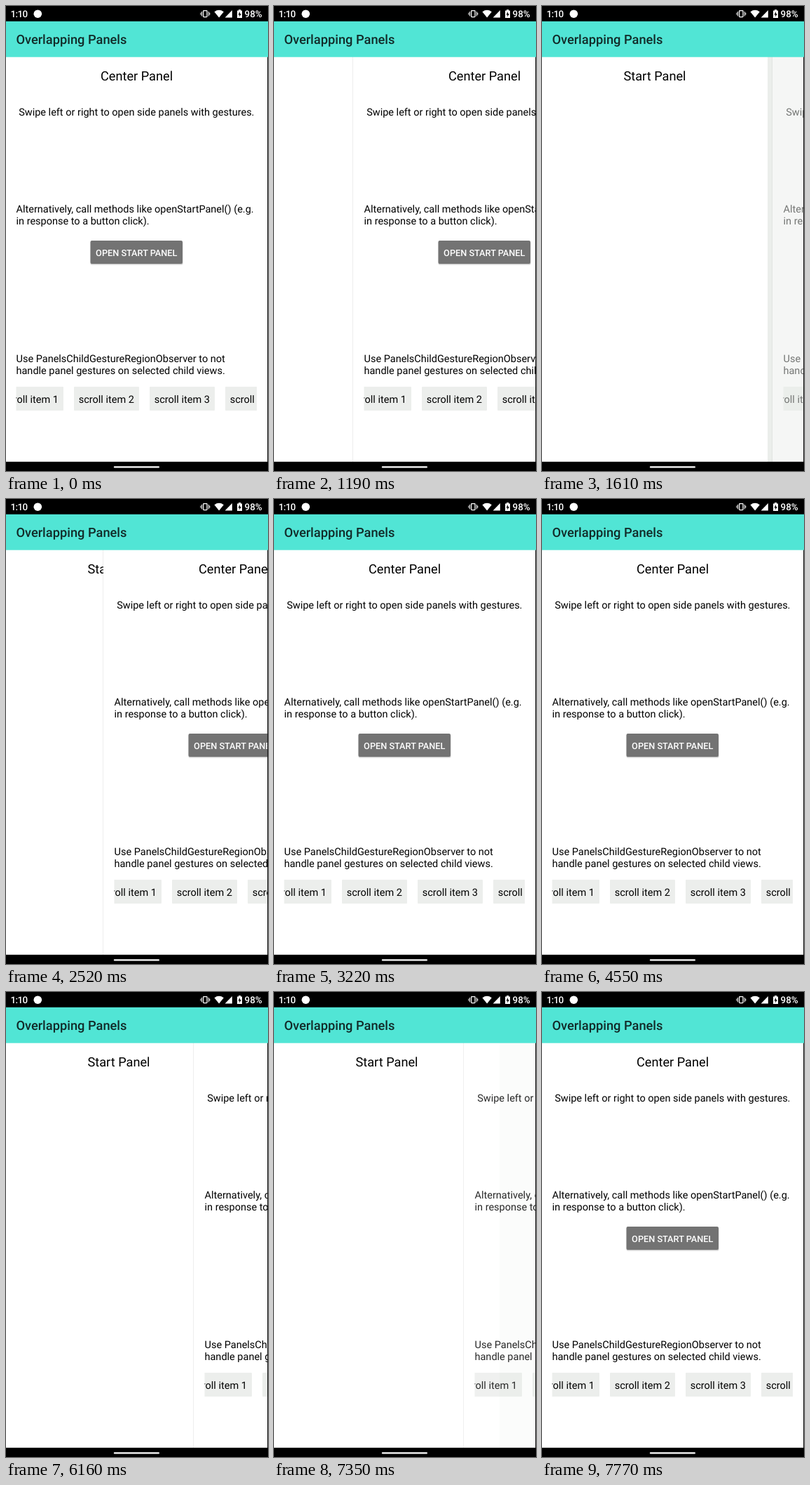
Write an HTML page that moves like this. It is 374 px wide and 662 px high and loops after 8 s.

```html
<!DOCTYPE html>
<html lang="en">
<head>
<meta charset="utf-8">
<title>Overlapping Panels</title>
<style>
  html, body { margin: 0; width: 100%; height: 100%; overflow: hidden; background: #000; }
  svg { display: block; width: 374px; height: 662px; font: 14.5px Roboto, sans-serif; text-rendering: geometricPrecision; }
  .head { font-size: 18.2px; }
  .mid { text-anchor: middle; }
  .title { font-size: 18.25px; font-weight: 500; fill: #122b29; }
  .button { font-size: 12.73px; font-weight: 500; fill: #fff; }
  .status { font-size: 13.4px; font-weight: 500; fill: #fff; }
  .clock { letter-spacing: -.6px; }
  .chip { fill: #eceeec; }
</style>
</head>
<body>
<svg viewBox="0 0 374 662">
  <defs>
    <clipPath id="strip"><rect x="14.5" y="540" width="343.5" height="40"/></clipPath>
  </defs>

  <rect y="72" width="374" height="577" fill="#ebeeeb"/>
  <g id="start">
    <rect y="72" width="322" height="577" fill="#fff"/>
    <text class="head mid" x="161" y="106">Start Panel</text>
  </g>
  <g id="end">
    <rect x="51" y="72" width="323" height="577" fill="#fff"/>
    <text class="head mid" x="211.7" y="106">End Panel</text>
  </g>

  <g id="center">
    <path d="M-1.5 72V649M374.5 72V649" stroke="#000" stroke-opacity=".07"/>
    <rect x="-1" y="72" width="375" height="577" fill="#fff"/>
    <text class="head mid" x="186.5" y="106">Center Panel</text>
    <text class="mid" x="186.3" y="156">Swipe left or right to open side panels with gestures.</text>
    <text x="14.5" y="293.5">Alternatively, call methods like openStartPanel() (e.g.</text>
    <text x="14.5" y="310.5">in response to a button click).</text>
    <rect x="120.5" y="335" width="132" height="33.5" rx="2" opacity=".18"/>
    <rect x="120.5" y="334" width="131.5" height="33" rx="2" fill="#737373"/>
    <text class="button mid" x="186.2" y="356">OPEN START PANEL</text>
    <text x="14.5" y="506.5">Use PanelsChildGestureRegionObserver to not</text>
    <text x="14.5" y="523.5">handle panel gestures on selected child views.</text>
    <g id="chips" clip-path="url(#strip)"></g>
  </g>

  <rect x="373" y="72" width="1" height="577" fill="#1c1c1c"/>
  <rect width="374" height="22"/>
  <rect y="21.8" width="374" height="50.9" fill="#51e5d5"/>
  <text class="title" x="14.4" y="54">Overlapping Panels</text>

  <text class="status clock" x="6.5" y="16">1:10</text>
  <g fill="#fff">
    <circle cx="45.3" cy="11.2" r="5.8"/>
    <rect x="281.6" y="6.6" width="5.4" height="9" rx=".8" fill="none" stroke="#fff" stroke-width="1.3"/>
    <path d="M279.4 8v6.4M289.3 8v6.4M277.9 9.6v3M290.8 9.6v3" stroke="#fff"/>
    <path d="M297.4 8.2Q304 3.4 310.8 8.2L304.1 16.4Z"/>
    <path d="M312.6 16.4L322.8 6V16.4Z"/>
    <path d="M330 6.4H332V5H335V6.4H337V17H330Z"/>
    <path d="M334 8L331.4 12.4H333.2V15.4L335.7 11H334Z" fill="#000"/>
  </g>
  <text class="status" x="340.6" y="16">98%</text>

  <rect y="648.8" width="374" height="13.2"/>
  <rect x="153.8" y="655.3" width="65.2" height="2.2" rx="1.1" fill="#fff"/>
</svg>

<script>
  const LOOP = 8000, TICK = 70, OPEN_X = 330, DIM = 0.5, FADE = 210;

  // Each visit to a side panel: side, open from/to, close from/to (ms).
  const visits = [
    [1, 1050, 1400, 2240, 2750],
    [-1, 3220, 3570, 3990, 4500],
    [1, 5810, 6298, 7210, 7720]
  ];

  const $ = id => document.getElementById(id);
  const [start, end, center] = ['start', 'end', 'center'].map($);
  const ramp = (t, a, b) => Math.min(1, Math.max(0, (t - a) / (b - a)));
  const ease = p => (1 - Math.cos(Math.PI * p)) / 2;

  $('chips').innerHTML = [1, 2, 3, 4].map(n => {
    const x = 108 * n - 119;
    return `<rect class="chip" x="${x}" y="542" width="93" height="34" rx="1"/>
      <text x="${x + 6.7}" y="564.5">scroll item ${n}</text>`;
  }).join('');

  function pose(t) {
    let x = 0, dim = 0;
    for (const [side, a, b, c, d] of visits) {
      x += side * OPEN_X * (ease(ramp(t, a, b)) - ease(ramp(t, c, d)));
      dim += ramp(t, b, b + FADE) - ramp(t, c, c + FADE);
    }
    return { x: Math.round(x), alpha: 1 - DIM * dim };
  }

  function draw() {
    const now = performance.now() % LOOP;
    const { x, alpha } = pose(Math.floor(now / TICK) * TICK);
    center.setAttribute('transform', `translate(${x} 0)`);
    center.setAttribute('opacity', alpha);
    start.style.display = x < 0 ? 'none' : '';
    end.style.display = x < 0 ? '' : 'none';
    requestAnimationFrame(draw);
  }
  draw();
</script>
</body>
</html>
```
